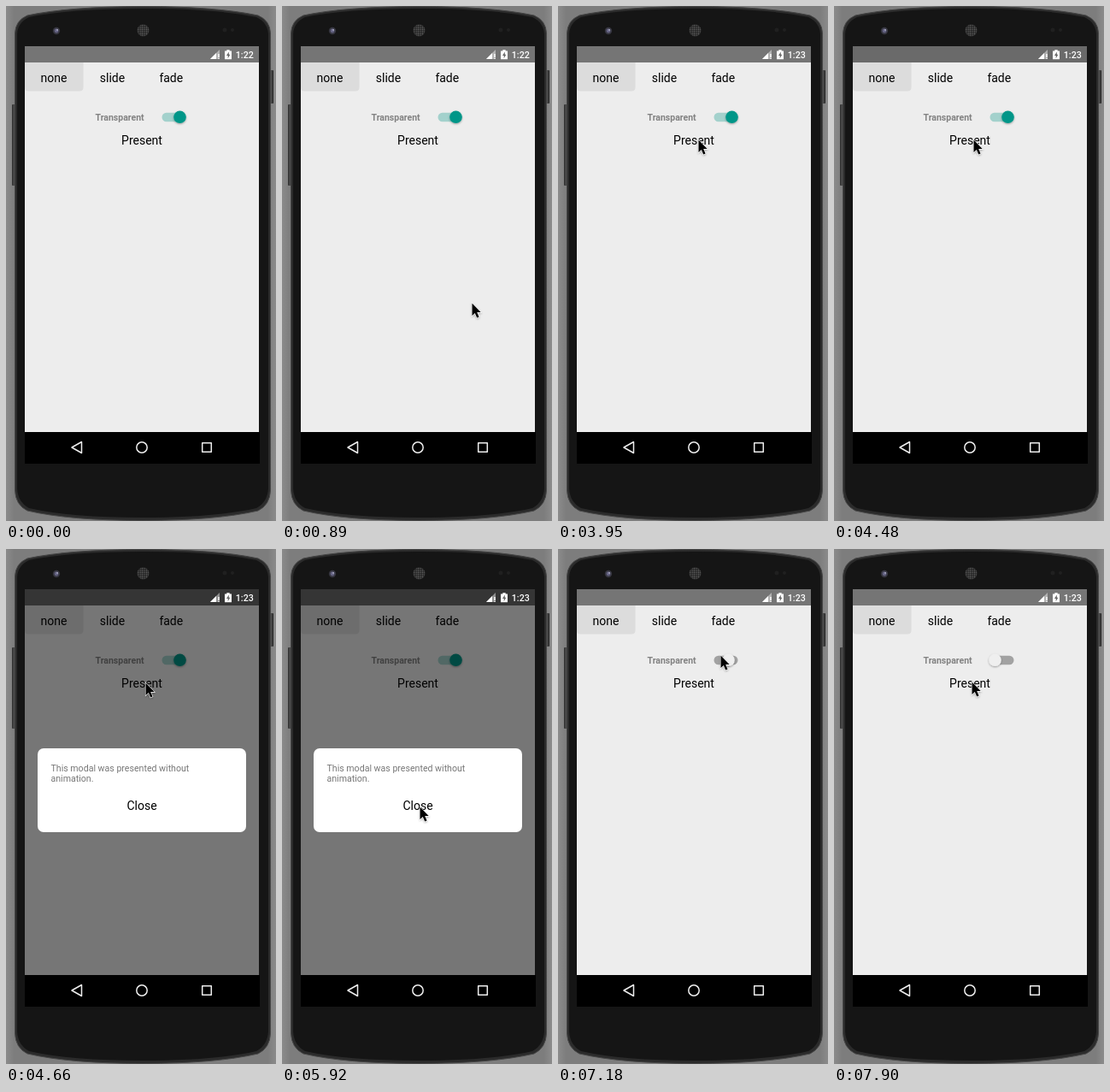
Recreate the animation shown at these times as an HTML page. Size 316x602 px, loop 8000 ms.

```html
<!DOCTYPE html>
<html lang="en">
<head>
<meta charset="utf-8">
<title>Modal demo</title>
<style>
html, body { margin: 0; width: 100%; height: 100%; overflow: hidden; background: #858585; }
svg { display: block; width: 316px; height: 602px; }
text { font-family: Roboto, sans-serif; font-size: 14px; }
.mid { text-anchor: middle; }
.small { font-size: 10.6px; fill: #777; }
</style>
</head>
<body>
<svg viewBox="0 0 316 602">
  <defs>
    <linearGradient id="bg">
      <stop offset="0" stop-color="#8b8b8b"/><stop offset=".03" stop-color="#7d7d7d"/>
      <stop offset=".97" stop-color="#7d7d7d"/><stop offset="1" stop-color="#8b8b8b"/>
    </linearGradient>
    <linearGradient id="key">
      <stop offset="0" stop-color="#222"/><stop offset=".5" stop-color="#555"/><stop offset="1" stop-color="#111"/>
    </linearGradient>
    <pattern id="mesh" width="2.4" height="2.4" patternUnits="userSpaceOnUse">
      <rect width="2.4" height="2.4" fill="#222"/><circle cx="1.2" cy="1.2" r=".75" fill="#666"/>
    </pattern>
    <filter id="shade" x="-50%" y="-50%" width="200%" height="200%">
      <feDropShadow dx="0" dy="1" stdDeviation=".8" flood-opacity=".35"/>
    </filter>
  </defs>

  <!-- Phone -->
  <rect width="316" height="602" fill="url(#bg)"/>
  <rect x="7" y="115" width="4" height="95" rx="1" fill="url(#key)"/>
  <rect x="309" y="75" width="4" height="39" rx="1" fill="url(#key)"/>
  <path d="M10.5 32Q11 17 25 11Q75 .5 160 .5T295 11Q309 17 309.500 32V566Q309 583 295 590Q245 601.500 160 601.500T25 590Q11 583 10.500 566Z" fill="#2b2b2b" stroke="#474747"/>
  <path d="M13 33Q14 19 27 13Q75 3 160 3T293 13Q306 19 307 33V564Q306 580 293 587Q245 598 160 598T27 587Q14 580 13 564Z" fill="#151515"/>
  <circle cx="59" cy="29" r="4.200" fill="#373741"/>
  <circle cx="59" cy="29" r="2.400" fill="#656383"/>
  <circle cx="60" cy="28" r="1" fill="#aaa9c0"/>
  <circle cx="160.500" cy="28.500" r="7" fill="url(#mesh)"/>
  <circle cx="256" cy="28" r="2.500" fill="#202020"/>
  <circle cx="265" cy="28" r="2" fill="#202020"/>

  <!-- App -->
  <rect x="22" y="47" width="274" height="451" fill="#ededed"/>
  <rect id="bar" x="22" y="47" width="274" height="19"/>
  <path d="M22 66H90.500V95Q90.500 99.500 86 99.500H26Q22 99.500 22 95Z" fill="#dcdcdc"/>
  <g class="mid">
    <text x="56" y="89">none</text>
    <text x="124.500" y="89">slide</text>
    <text x="193.300" y="89">fade</text>
    <text x="159" y="162">Present</text>
  </g>
  <text x="104.500" y="134" style="font-size:10.5px;font-weight:700" fill="#828282">Transparent</text>
  <rect id="track" x="182.500" y="124.800" width="28" height="10.400" rx="5.200"/>
  <circle id="thumb" cy="129.800" r="7.300" filter="url(#shade)"/>

  <g id="modal">
    <rect x="22" y="47" width="274" height="451" opacity=".5"/>
    <rect x="37" y="233" width="244" height="98" rx="7" fill="#fff"/>
    <text class="small" x="52.500" y="259.500">This modal was presented without</text>
    <text class="small" x="52.500" y="271.800">animation.</text>
    <text class="mid" x="159" y="305">Close</text>
  </g>

  <!-- System bars -->
  <path d="M239 62L250 51V62Z" fill="#fff" opacity=".45"/>
  <path d="M239 62L246 55V62Z" fill="#fff"/>
  <path d="M249 56V60M249 61V62" stroke="#fff" stroke-width="1.400"/>
  <path d="M258.300 51.300H261.700V52.500H264V62.300H256V52.500H258.300Z" fill="#fff"/>
  <path d="M260.800 53.500L258 58H259.700V61.300L262.300 56.800H260.800Z" fill="#666"/>
  <text id="clock" x="268.800" y="61" fill="#fff" style="font-size:10.7px;font-weight:500"></text>
  <rect x="22" y="498" width="275" height="37"/>
  <g fill="none" stroke="#eee" stroke-width="1.500" stroke-linejoin="round">
    <path d="M77 516L88.500 509.500V522.500Z"/>
    <circle cx="159" cy="516" r="6.200"/>
    <rect x="229.700" y="510.700" width="10.600" height="10.600"/>
  </g>

  <path id="cursor" d="M1.500 .5V15L4.800 11.900L7.200 17.500L9.600 16.500L7.200 11.100H11.700Z" stroke="#fff" stroke-width="1.100" paint-order="stroke" filter="url(#shade)"/>
</svg>
<script>
const LOOP = 8000;
// Pointer stops: time, x, y
const stops = [
  [710, 227, 351], [890, 221, 347], [1070, 156, 168], [1250, 166, 167],
  [1430, 165, 160], [1610, 164, 156], [3950, 163, 156], [4130, 162, 156],
  [5200, 157, 260], [5380, 156, 287], [5560, 159, 308], [5920, 160, 301],
  [6280, 185, 242], [6460, 188, 108], [6640, 188, 121], [6820, 189, 124],
  [7540, 179, 138], [7720, 165, 151], [7900, 160, 155]
];
const el = id => document.getElementById(id);
const set = (id, name, value) => el(id).setAttribute(name, value);
const show = (id, on) => set(id, 'visibility', on ? 'visible' : 'hidden');

function draw(t) {
  const stop = stops.filter(s => s[0] <= t).pop();
  show('cursor', stop);
  if (stop) set('cursor', 'transform', `translate(${stop[1]} ${stop[2]})`);

  show('modal', t >= 4660 && t < 6280);
  set('bar', 'fill', t >= 4480 && t < 6460 ? '#6a6a6a' : '#757575');
  el('clock').textContent = t < 3950 ? '1:22' : '1:23';

  const on = t < 7180;
  set('track', 'fill', on ? '#a3d1cc' : '#a2a2a2');
  set('thumb', 'fill', on ? '#009688' : '#efefef');
  set('thumb', 'cx', on ? 203.5 : t < 7360 ? 199.5 : 188.5);
}

function tick() {
  draw(performance.now() % LOOP);
  requestAnimationFrame(tick);
}
tick();
</script>
</body>
</html>
```
